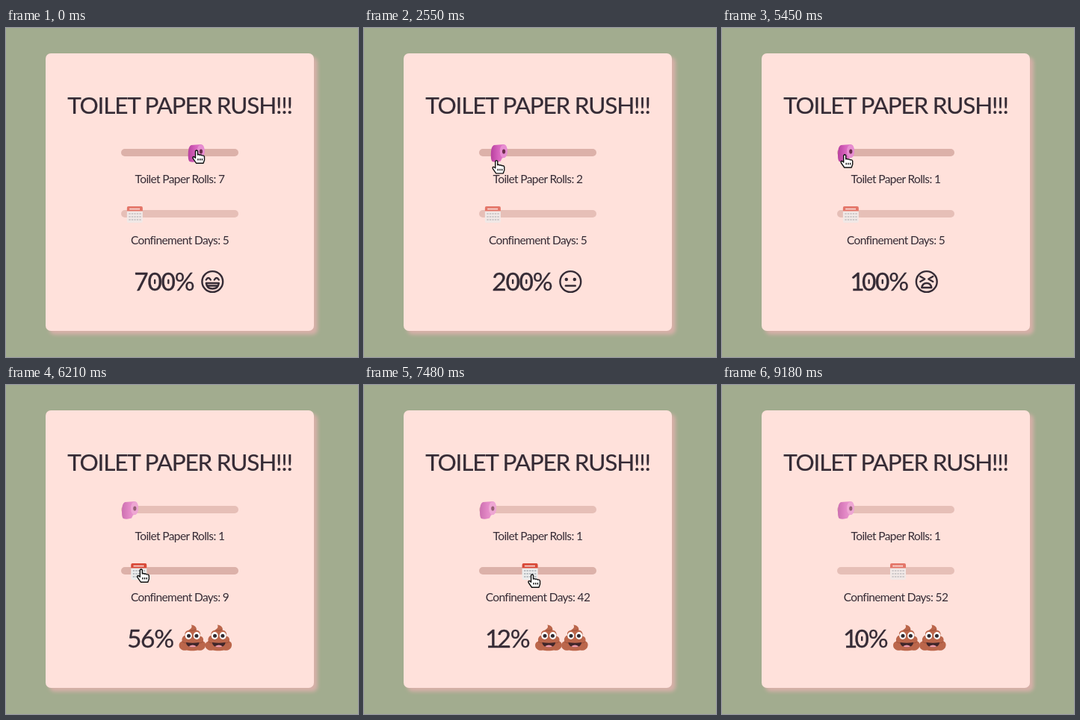
Write an HTML page that moves like this. It is 471 px wide and 441 px high and loops after 9330 ms.

```html
<!DOCTYPE html>
<html lang="en">
<head>
<meta charset="utf-8">
<title>Toilet Paper Rush</title>
<style>
  html, body { margin: 0; width: 100%; height: 100%; overflow: hidden; background: #a2ac8f; }
  .card { position: absolute; left: 53px; top: 34px; width: 359px; height: 372px;
    border-radius: 7px; background: #ffe1db; box-shadow: 5px 5px 5px #d6b0a8; }
  svg { position: absolute; left: 0; top: 0; }
  text { font-family: Lato, sans-serif; fill: #352b35; }
  .title { font-size: 31.5px; letter-spacing: -1.2px; stroke: #352b35; stroke-width: .2px; }
  .label { font-size: 15.5px; letter-spacing: -.62px; }
  .score { font-size: 33.5px; letter-spacing: -1.3px; stroke: #352b35; stroke-width: .3px; }
  .track { fill: #dcb1a9; }
  .line { fill: none; stroke: #352b35; stroke-width: 2.4; stroke-linecap: round; stroke-linejoin: round; }
  .cursor { fill: #fff; stroke: #111; stroke-width: 1.4; stroke-linejoin: round; }
</style>
</head>
<body>
<div class="card"></div>
<svg width="471" height="441" viewBox="0 0 471 441">
  <defs>
    <linearGradient id="paper">
      <stop offset="0" stop-color="#b8409f"/>
      <stop offset=".45" stop-color="#d763bd"/>
      <stop offset="1" stop-color="#e88bd2"/>
    </linearGradient>
    <g id="poop">
      <path fill="#bb664b" d="M16 .5c5 0 8 4 7 7 5 1 6 4 5 8 4 1 5 4 4 7 3 1 4 4 3 7-1 4-5 6-10 5-3 1-12 1-15 0-5 1-9-1-10-5-.500-4 1-6 4-7-1-4 1-7 4-8-1-4 1-6 5-7 3-2 5-4 3-7z"/>
      <path fill="none" stroke="#a0523b" stroke-linecap="round" d="M14 8q5 1 8-1M4 23q2 2 5 2M32 23q-2 2-5 2"/>
      <g fill="#fff"><ellipse cx="12.500" cy="15" rx="4.500" ry="4.900"/><ellipse cx="23.500" cy="15" rx="4.500" ry="4.900"/></g>
      <g fill="#302a30"><circle cx="12.800" cy="15.200" r="2.500"/><circle cx="23.200" cy="15.200" r="2.500"/></g>
      <path fill="#40262a" d="M9 24q9 1.500 18 0-1 6.500-9 6.500T9 24z"/>
      <path fill="#ef9aa8" d="M13 29.300q5-3.400 10 0-2 1.200-5 1.200t-5-1.200z"/>
    </g>
  </defs>

  <text class="title" x="232.500" y="115" text-anchor="middle">TOILET PAPER RUSH!!!</text>

  <g id="rolls">
    <rect class="track" x="154" y="162" width="157" height="10" rx="5"/>
    <g class="thumb">
      <path fill="url(#paper)" d="M5 1.500 18 .500c3.500 0 5 4 5 9s-2 9-5 9l-2 .500-2 4q-6 2-11 .500-2-1-2-9Q1 3 5 1.500z"/>
      <ellipse cx="18" cy="9.800" rx="5" ry="8.800" fill="#e78ed1"/>
      <ellipse cx="18.300" cy="10" rx="2.100" ry="3.100" fill="#6d2c4c"/>
    </g>
  </g>
  <text class="label" id="rollText" x="232.500" y="208" text-anchor="middle"></text>

  <g id="days">
    <rect class="track" x="154" y="244" width="157" height="10" rx="5"/>
    <g class="thumb">
      <path fill="#ececec" d="M2.500 7h21v14.500q0 2-2 2h-17q-2 0-2-2z"/>
      <path fill="#d94a39" d="M4.500 1.500h17q2 0 2 2V8h-21V3.500q0-2 2-2z"/>
      <path fill="none" stroke="#fff" stroke-width="1.700" d="M6 5.200h14" stroke-dasharray="1.500 .500"/>
      <path fill="none" stroke="#b9bec2" stroke-width="2" stroke-dasharray="2.300 1.200" d="M5 11.500h16.500M5 15.500h16.500M5 19.500h16.500"/>
    </g>
  </g>
  <text class="label" id="dayText" x="232.500" y="290" text-anchor="middle"></text>

  <g id="result">
    <text class="score" id="score" y="352"></text>
    <path class="line" id="dots"/>
    <g id="mood"></g>
  </g>

  <path class="cursor" id="cursor"/>
</svg>

<script>
const LOOP = 9330, LEFT = 154, TRAVEL = 133;
const $ = id => document.getElementById(id);

// pointer moves: begin, end, then the place it comes to rest
const moves = [
  [0, 0, 255, 164], [550, 610, 243, 163], [820, 1240, 194, 159.5],
  [1540, 1550, 204, 161], [1760, 1970, 178, 164],
  [2450, 2850, 175, 218], [2850, 3240, 178, 164], [3480, 3640, 170.5, 164.5],
  [4420, 4450, 163.5, 165], [5420, 5950, 176, 247],
  [6050, 6450, 188, 247], [6640, 6910, 208, 250],
  [7120, 7300, 224.6, 254], [7470, 7820, 238.5, 256], [8150, 8880, 72, -22]
];

// each slider follows the pointer only between press and release
const sliders = {
  rolls: { top: 155, max: 10, grip: 0, press: 0, release: 5000 },
  days: { top: 237, max: 100, grip: 4, press: 6050, release: 8150 }
};

const faces = {
  happy: '<path d="M7.500 13.500q3-5 6 0M18.500 13.500q3-5 6 0M7.500 18h17q-1 7.500-8.500 7.500T7.500 18zM9.500 21.500h13"/>',
  flat: '<path d="M9.500 21.500h13"/><g fill="#352b35" stroke="none"><circle cx="10.500" cy="13" r="2.200"/><circle cx="21.500" cy="13" r="2.200"/></g>',
  tired: '<path d="M7.500 9l6 3.500-6 3.500M24.500 9l-6 3.500 6 3.500M9.500 24q1-6 6.500-6t6.500 6z"/>'
};
const hand = 'M-1.500 1q1.500-2 3 0v5q1.500-1 2.800.300 1.600-.700 2.900.600 2.800-.400 3.300 1.600v4.500l-1.500 4.200H-.500l-4.200-6q-1-2.300.500-2.700 1.300 0 2.700 1.700zM2 11v2.500M4.700 11v2.500M7.400 11v2.500';
const arrow = 'M0 0v16l3.700-3.500 2.400 5.500 2.400-1-2.400-5.400h5z';

const clamp = (v, lo, hi) => Math.min(hi, Math.max(lo, v));

function pointerAt(t) {
  let x = 0, y = 0;
  for (const [begin, end, toX, toY] of moves) {
    if (t < begin) break;
    const f = clamp((t - begin) / (end - begin || 1), begin === end ? 1 : 0, 1);
    x += (toX - x) * f;
    y += (toY - y) * f;
  }
  return { x, y };
}

function valueAt({ max, grip, press, release }, t) {
  const part = (pointerAt(clamp(t, press, release)).x - grip - LEFT - 12) / TRAVEL;
  return 1 + Math.round(clamp(part, 0, 1) * (max - 1));
}

function moodFor(percent) {
  if (percent < 100) return 'poop';
  return percent >= 500 ? 'happy' : percent >= 200 ? 'flat' : 'tired';
}

let shown = '';
function showValues(rolls, days) {
  const key = rolls + '/' + days;
  if (key === shown) return;
  shown = key;
  $('rollText').textContent = 'Toilet Paper Rolls: ' + rolls;
  $('dayText').textContent = 'Confinement Days: ' + days;

  const percent = Math.round(rolls * 500 / days), chars = [...percent + '%'];
  const score = $('score');
  score.textContent = chars.join('');
  // kern around the narrow digit 1
  score.setAttribute('dx', chars.map((c, i) => -2.5 * ((c === '1') + (chars[i - 1] === '1'))).join(' '));
  $('dots').setAttribute('d', chars.map((c, i) =>
    c === '0' ? `M${score.getStartPositionOfChar(i).x + 9.7} 338v4` : '').join(''));

  const end = score.getEndPositionOfChar(chars.length - 1).x;
  const mood = moodFor(percent), poop = mood === 'poop';
  $('mood').innerHTML = poop
    ? `<use href="#poop" x="${end + 8}" y="321"/><use href="#poop" x="${end + 43}" y="321"/>`
    : `<g class="line" transform="translate(${end + 9} 324)"><circle cx="16" cy="16" r="13.900"/>${faces[mood]}</g>`;
  const width = end + (poop ? 79 : 42);
  $('result').setAttribute('transform', `translate(${232.3 - width / 2} 0)`);
}

function placeSlider(id, value, { x, y }) {
  const { top, max } = sliders[id];
  const over = x > LEFT && x < LEFT + 157 && y > top && y < top + 24;
  const thumbX = LEFT + TRAVEL * (value - 1) / (max - 1);
  $(id).setAttribute('opacity', over ? 1 : .7);
  $(id).querySelector('.thumb').setAttribute('transform', `translate(${thumbX} ${top + .5})`);
  return over;
}

function draw(t) {
  const p = pointerAt(t);
  const rolls = valueAt(sliders.rolls, t), days = valueAt(sliders.days, t);
  showValues(rolls, days);
  const overRolls = placeSlider('rolls', rolls, p), overDays = placeSlider('days', days, p);
  $('cursor').setAttribute('d', overRolls || overDays ? hand : arrow);
  $('cursor').setAttribute('transform', `translate(${p.x} ${p.y})`);
}

const start = performance.now();
function tick() {
  draw((performance.now() - start) % LOOP);
  requestAnimationFrame(tick);
}
tick();
</script>
</body>
</html>
```
